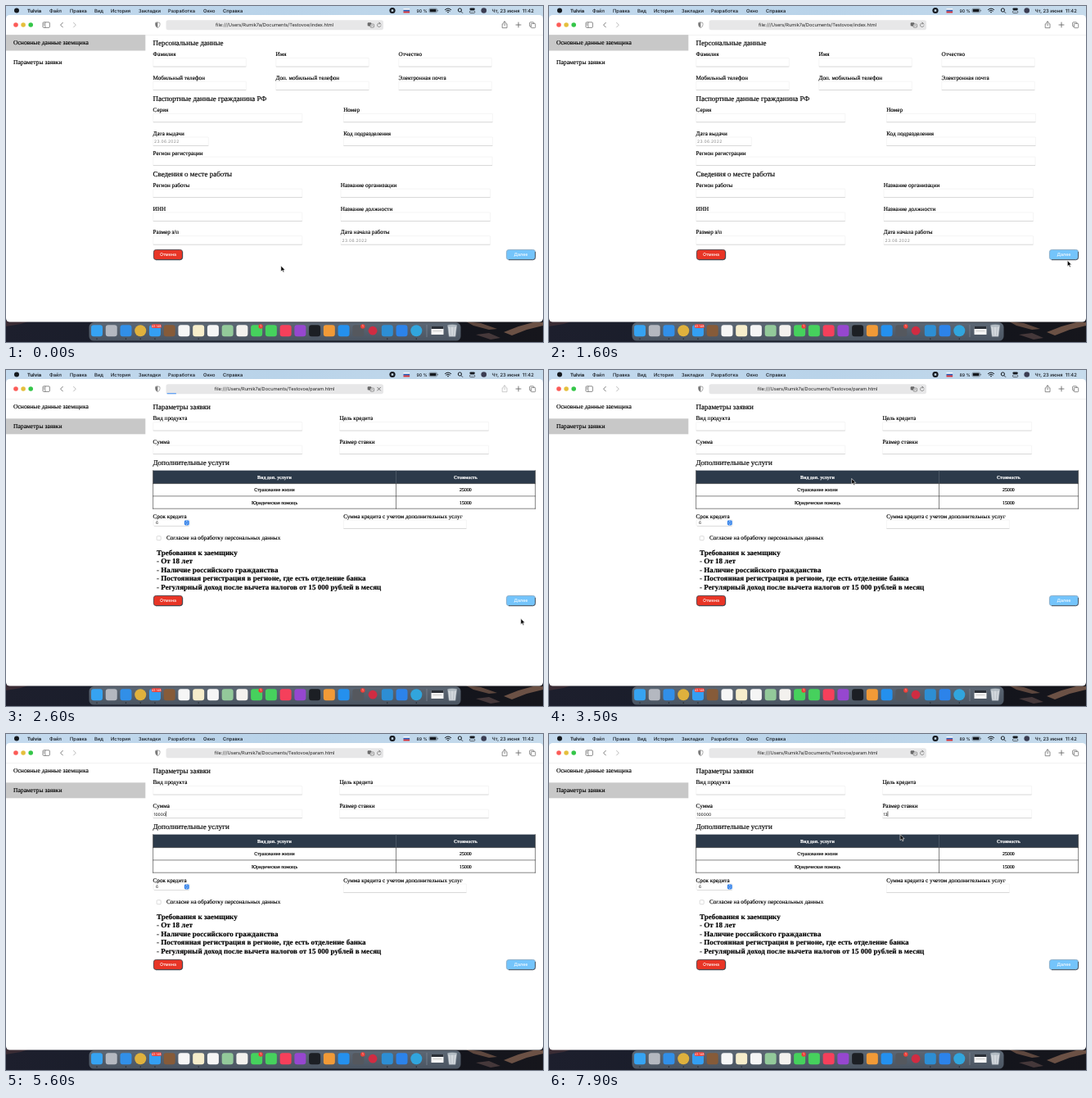
An HTML page that plays this animation: 656 px wide and 410 px high, repeating every 8 s.

```html
<!DOCTYPE html>
<html lang="ru">
<head>
<meta charset="utf-8">
<title>Заявка на кредит</title>
<style>
  html, body { margin: 0; width: 100%; height: 100%; overflow: hidden; background: #fff; }
  svg { display: block; width: 100vw; height: 100vh; }
  text { text-rendering: geometricPrecision; white-space: pre; }
  .serif { font-family: "Liberation Serif", "Noto Serif", serif; stroke-width: 0.16; }
  .ui { font-family: Inter, Roboto, sans-serif; }
</style>
</head>
<body>
<svg id="stage" viewBox="0 0 656 410" xmlns="http://www.w3.org/2000/svg"></svg>
<script>
const LOOP = 8000;
const stage = document.getElementById('stage');

// --- drawing helpers ---
function add(parent, tag, attrs = {}, content) {
  const node = document.createElementNS('http://www.w3.org/2000/svg', tag);
  for (const key in attrs) node.setAttribute(key, attrs[key]);
  if (content !== undefined) node.textContent = content;
  parent.appendChild(node);
  return node;
}
const group = parent => add(parent, 'g');
const rect = (p, x, y, width, height, fill, rx = 0, more = {}) =>
  add(p, 'rect', { x, y, width, height, fill, rx, ...more });
const circle = (p, cx, cy, r, fill) => add(p, 'circle', { cx, cy, r, fill });
const line = (p, d, stroke, width = 0.8) =>
  add(p, 'path', { d, stroke, 'stroke-width': width, fill: 'none', 'stroke-linecap': 'round', 'stroke-linejoin': 'round' });
const serif = (p, x, y, size, str, more = {}) => {
  const fill = more.fill || '#000';
  return add(p, 'text', { x, y, 'font-size': size, class: 'serif', stroke: fill, ...more, fill }, str);
};
const ui = (p, x, y, size, str, more = {}) =>
  add(p, 'text', { x, y, 'font-size': size, class: 'ui', fill: '#12161c', ...more }, str);
const show = (node, visible) => node.setAttribute('visibility', visible ? 'inherit' : 'hidden');
const moveTo = (node, x, y) => node.setAttribute('transform', `translate(${x} ${y})`);
const middle = { 'text-anchor': 'middle' };

function gradient(id, vertical, colors) {
  const g = add(stage, 'linearGradient', { id, x2: vertical ? 0 : 1, y2: vertical ? 1 : 0 });
  colors.forEach((color, i) =>
    add(g, 'stop', { offset: i / (colors.length - 1), 'stop-color': color }));
  return `url(#${id})`;
}

// --- desktop, menu bar ---
function drawDesktop() {
  rect(stage, 0, 0, 656, 410, gradient('sky', false, ['#c4daee', '#b9d3e9', '#c6dbec']));
  rect(stage, 0, 370, 656, 40, gradient('hills', false, ['#1d1f2d', '#191d2a', '#141823', '#12141c', '#16161c']));
  add(stage, 'path', { d: 'M0 384H30L18 388L0 391Z', fill: '#3a2c34' });
  // lit rocks on the right slope
  add(stage, 'path', { d: 'M562 385L580 387L600 394L590 395L571 390Z', fill: '#5d473e' });
  add(stage, 'path', { d: 'M608 398L626 391L644 386H656V390L636 395L618 402Z', fill: '#6b5145' });
  add(stage, 'path', { d: 'M574 401L590 399L604 405L592 407Z', fill: '#45383a' });
}

let battery;
function drawMenuBar() {
  circle(stage, 13, 5.5, 3, '#15191f');
  ui(stage, 26, 7.7, 5.8, 'Tulvia', { 'font-weight': 700 });
  const menus = { 53: 'Файл', 78: 'Правка', 108: 'Вид', 128: 'История', 162: 'Закладки',
    198: 'Разработка', 241: 'Окно', 265: 'Справка' };
  for (const x in menus) ui(stage, x, 7.7, 5.75, menus[x], { 'font-weight': 500 });

  circle(stage, 472, 5.5, 3.6, '#15191f');
  rect(stage, 470.7, 4.2, 2.6, 2.6, '#c4d8ea', 0.4);
  ['#f7f7f7', '#2456b5', '#d82f35'].forEach((color, i) => rect(stage, 485.5, 3 + i * 1.8, 7.6, 1.8, color));
  battery = ui(stage, 501.5, 7.5, 5.2, '90 %', { 'font-weight': 500 });
  rect(stage, 517, 3.1, 9.6, 4.9, 'none', 1.3, { stroke: '#4b5560', 'stroke-width': 0.5 });
  rect(stage, 517.7, 3.8, 7.8, 3.5, '#15191f', 0.7);
  rect(stage, 527.2, 4.7, 0.8, 1.7, '#4b5560', 0.4);
  line(stage, 'M536.4 4.5Q540 1.5 543.6 4.5M537.7 6Q540 4.2 542.3 6', '#15191f', 1);
  circle(stage, 540, 7.6, 0.8, '#15191f');
  circle(stage, 554.4, 5, 2.1, 'none').setAttribute('stroke', '#15191f');
  line(stage, 'M556 6.7L557.8 8.5', '#15191f');
  rect(stage, 566.4, 2.4, 6.4, 2.7, '#15191f', 1.3);
  rect(stage, 566.4, 5.9, 6.4, 2.7, 'none', 1.3, { stroke: '#15191f', 'stroke-width': 0.6 });
  circle(stage, 583.7, 5.5, 3.3, '#3b3d52');
  ui(stage, 593.6, 7.7, 5.85, 'Чт, 23 июня  11:42', { 'font-weight': 500 });
}

// --- browser window ---
let address, reload, stop, progress, share;
function drawWindow() {
  rect(stage, 0, 11, 656, 374.5, '#fff', 4.5);
  ['#fc5b57', '#e5bf3c', '#35c649'].forEach((color, i) => circle(stage, 12 + i * 9.1, 23, 2.8, color));
  rect(stage, 45, 19.8, 8.4, 6.6, 'none', 1.2, { stroke: '#5c5c5c', 'stroke-width': 0.7 });
  line(stage, 'M47.9 20V26.2M46.2 21.8H46.8M46.2 23.2H46.8', '#5c5c5c', 0.6);
  line(stage, 'M69.3 20.3L66.6 23.1L69.3 25.9', '#5c5c5c');
  line(stage, 'M82.6 20.3L85.3 23.1L82.6 25.9', '#a9a9a9');
  line(stage, 'M185.3 19.8L188 20.7V23Q188 25.5 185.3 26.6Q182.6 25.5 182.6 23V20.7Z', '#777', 0.6);
  add(stage, 'path', { d: 'M185.3 19.8V26.6Q182.6 25.5 182.6 23V20.7Z', fill: '#777' });
  rect(stage, 195.5, 17.2, 265.5, 12, '#e7e7e8', 2.6);
  address = ui(stage, 328, 25.1, 5.65, '', { ...middle, fill: '#1f1f1f' });
  progress = rect(stage, 196.5, 28.2, 11.5, 1, '#3b8cf4', 0.5);

  rect(stage, 441.7, 20.2, 4.6, 4.2, '#666', 1);
  rect(stage, 445, 22, 4.6, 4.2, '#e7e7e8', 1, { stroke: '#666', 'stroke-width': 0.6 });
  line(stage, 'M443 22.3H445M446.4 24.8L447.3 23L448.2 24.8', '#888', 0.5);
  reload = line(stage, 'M457.9 22.2A2.3 2.3 0 1 0 458 24.1M456 20.1L457.2 21.1L456.1 22.2', '#666', 0.7);
  stop = line(stage, 'M453.7 21.2L457.5 25M457.5 21.2L453.7 25', '#555', 0.8);
  share = line(stage, 'M607.3 21.8H606.2V26.7H612V21.8H610.9M609.1 24V18.9M607.4 20.5L609.1 18.8L610.8 20.5', '#5c5c5c', 0.7);
  line(stage, 'M623 23H629M626 20V26', '#5c5c5c');
  rect(stage, 639.6, 19.8, 5.3, 5.3, 'none', 1, { stroke: '#5c5c5c', 'stroke-width': 0.7 });
  rect(stage, 641.4, 21.4, 5.3, 5.3, '#fff', 1, { stroke: '#5c5c5c', 'stroke-width': 0.7 });
  rect(stage, 0, 35, 656, 0.4, '#dedede');
}

// --- dock ---
function drawDock() {
  rect(stage, 101.5, 386.3, 454, 22.2, gradient('glass', true, ['#5c6774', '#4b5562']), 5.5);
  const colors = ['#36a3f2', '#b4b8c0', '#318fe8', '#dfb13d', '#349ff3', '#865b39', '#f6f6f6', '#f6edcb',
    '#f5f5f5', '#93c99a', '#f3f1ee', '#46d15d', '#46d15d', '#f5405b', '#9647cf', '#1c1f24',
    '#f19a37', '#2490ee', '#55585e', '#d02c42', '#2d8ed4', '#2c83ea', '#31a5dd'];
  const round = [3, 19, 22];
  const running = [0, 2, 3, 4, 7, 20, 22];
  const slot = i => 111 + i * 17.74;
  colors.forEach((color, i) => {
    const x = slot(i);
    if (round.includes(i)) circle(stage, x, 396.2, i === 19 ? 5.4 : 7, color);
    else rect(stage, x - 7, 389.2, 14, 14, color, 3.2);
    if (running.includes(i)) circle(stage, x, 406.1, 0.7, '#15191f');
  });
  rect(stage, 177.5, 388.3, 12.5, 4.8, '#ee3f38', 2.4);
  ui(stage, 183.7, 392.1, 3.6, '43 148', { ...middle, fill: '#fff' });
  for (const [i, dx] of [[11, 5], [18, 5.5]]) {
    circle(stage, slot(i) + dx, 391, 2.7, '#ee3f38');
    ui(stage, slot(i) + dx, 392.4, 3.8, '1', { ...middle, fill: '#fff' });
  }
  rect(stage, 513.7, 389, 0.6, 15, '#8791a0');
  rect(stage, 519.5, 391, 15, 10, '#f4f4f4', 0.6);
  rect(stage, 519.5, 391, 15, 3, '#2b3038', 0.6);
  rect(stage, 521.5, 396, 11, 0.7, '#bbb');
  add(stage, 'path', { d: 'M539.6 389.8H550.6L549 403.2H541.2Z', fill: '#d3d8dd', stroke: '#9aa4ae', 'stroke-width': 0.6 });
  line(stage, 'M543 391.5L543.6 401.5M547.2 391.5L546.6 401.5', '#a4adb6', 0.6);
  add(stage, 'ellipse', { cx: 545.1, cy: 390, rx: 5.5, ry: 1.2, fill: '#b9c1c8', stroke: '#8f9aa5', 'stroke-width': 0.4 });
}

// --- form parts ---
const heading = (p, y, str) => serif(p, 179.5, y, 8.98, str);
function input(p, x, y, width, height = 10.6) {
  rect(p, x, y, width, height, '#fff', 0.4, { stroke: '#ebebeb', 'stroke-width': 0.5 });
  rect(p, x, y + height - 0.4, width, 0.6, '#c6c6c6');
}
function field(p, x, baseline, width, str) {
  serif(p, x - 0.2, baseline, 7.15, str);
  input(p, x, baseline + 2.4, width);
}
const dateValue = (p, x, y) =>
  ui(p, x, y, 5, '23.06.2022', { fill: '#858585', 'letter-spacing': 0.35 });
function button(p, x, y, color, border, str) {
  const g = group(p);
  const box = rect(g, x, y, 35.2, 12.2, color, 3, { stroke: border, 'stroke-width': 0.9 });
  line(g, `M${x + 3} ${y + 12.3}H${x + 32.2}Q${x + 35.2} ${y + 12.3} ${x + 35.2} ${y + 9}V${y + 3}`, '#3f4650', 0.9);
  ui(g, x + 17.6, y + 8, 5.3, str, { ...middle, fill: '#fff', 'font-weight': 500 });
  return { g, box };
}
function buttons(p, y) {
  button(p, 180.4, y, '#e83526', '#4a3f47', 'Отмена');
  return button(p, 611.4, y, '#74c4fb', '#86a9c4', 'Далее');
}
function sidebar(p, bandY, bandHeight) {
  rect(p, 0, bandY, 170.3, bandHeight, '#c8c8c8');
  serif(p, 9, 47, 7.6, 'Основные данные заемщика');
  serif(p, 9, 71.2, 7.6, 'Параметры заявки');
}

let nextButton;
function drawBorrowerPage(p) {
  sidebar(p, 35.2, 19.3);
  heading(p, 48, 'Персональные данные');
  ['Фамилия', 'Имя', 'Отчество'].forEach((str, i) => field(p, 179.8 + i * 150, 61.1, 113.5, str));
  ['Мобильный телефон', 'Доп. мобильный телефон', 'Электронная почта']
    .forEach((str, i) => field(p, 179.8 + i * 150, 89.7, 113.5, str));
  heading(p, 116.2, 'Паспортные данные гражданина РФ');
  field(p, 179.8, 128.9, 182, 'Серия');
  field(p, 412.4, 128.9, 182, 'Номер');
  field(p, 179.8, 157.6, 67.5, 'Дата выдачи');
  dateValue(p, 181, 167.2);
  field(p, 412.4, 157.6, 182, 'Код подразделения');
  field(p, 179.8, 181.7, 414.2, 'Регион регистрации');
  heading(p, 208.1, 'Сведения о месте работы');
  [['Регион работы', 'Название организации'], ['ИНН', 'Название должности'], ['Размер з/п', 'Дата начала работы']]
    .forEach(([left, right], i) => {
      field(p, 179.8, 220.8 + i * 28.7, 182, left);
      field(p, 409, 220.8 + i * 28.7, 182.5, right);
    });
  dateValue(p, 410.5, 287.9);
  nextButton = buttons(p, 297.4);
}

let amount, rate;
function drawLoanPage(p) {
  sidebar(p, 59.3, 19);
  heading(p, 48, 'Параметры заявки');
  [['Вид продукта', 'Цель кредита'], ['Сумма', 'Размер ставки']].forEach(([left, right], i) => {
    field(p, 179.8, 61.1 + i * 28.6, 182, left);
    field(p, 407.6, 61.1 + i * 28.6, 182, right);
  });
  amount = ui(p, 180.4, 99.5, 5, '', { fill: '#000' });
  rate = ui(p, 408.4, 99.5, 5, '', { fill: '#000' });

  heading(p, 116.2, 'Дополнительные услуги');
  rect(p, 179.6, 122.6, 467, 16, '#2c3a4a');
  line(p, 'M179.6 138.6H646.6M179.6 153.9H646.6M179.6 169.2H646.6M179.6 122.6V169.2M476.5 138.6V169.2M646.6 122.6V169.2', '#333', 0.6);
  line(p, 'M476.5 122.8V138.4', '#66717d', 0.5);
  [['Вид доп. услуги', 'Стоимость'], ['Страхование жизни', '25000'], ['Юридическая помощь', '15000']]
    .forEach(([name, price], i) => {
      const style = i ? middle : { ...middle, fill: '#fff', 'font-weight': 700 };
      serif(p, 328, 132.6 + i * 15.5, 5.92, name, style);
      serif(p, 561.4, 132.6 + i * 15.5, 5.92, price, style);
    });

  serif(p, 179.6, 180.6, 7.15, 'Срок кредита');
  rect(p, 180, 182.6, 44.5, 7.9, '#fff', 1.6, { stroke: '#e2e2e2', 'stroke-width': 0.5 });
  rect(p, 181, 190.2, 42.5, 0.5, '#c6c6c6');
  ui(p, 183, 188.4, 5, '6', { fill: '#222' });
  rect(p, 217.9, 183.5, 5.8, 6, '#2f7fe9', 1.4);
  line(p, 'M219.6 185.8L220.8 184.6L222 185.8M219.6 187.2L220.8 188.4L222 187.2', '#fff', 0.6);
  field(p, 412.4, 180.6, 150, 'Сумма кредита с учетом дополнительных услуг');

  rect(p, 184.2, 202.7, 5, 5, '#fff', 1, { stroke: '#b5b5b5', 'stroke-width': 0.5 });
  serif(p, 196, 207.4, 7.15, 'Согласие на обработку персональных данных');
  ['Требования к заемщику', '- От 18 лет', '- Наличие российского гражданства',
    '- Постоянная регистрация в регионе, где есть отделение банка',
    '- Регулярный доход после вычета налогов от 15 000 рублей в месяц']
    .forEach((str, i) => serif(p, 184, 225.6 + i * 10.5, 9.05, str, { 'font-weight': 700 }));
  buttons(p, 275.4);
}

// --- scene ---
drawDesktop();
drawMenuBar();
drawWindow();
const borrowerPage = group(stage);
const loanPage = group(stage);
drawBorrowerPage(borrowerPage);
drawLoanPage(loanPage);
drawDock();
const caret = rect(stage, 0, 94.3, 0.6, 6.4, '#111');
const arrow = add(stage, 'path', { d: 'M0 0V7.1L1.7 5.6L2.8 8.1L4 7.6L2.9 5.2H5.1Z', fill: '#000', stroke: '#fff', 'stroke-width': 0.6 });
const beam = line(stage, 'M-1.2 -4Q0 -4 0 -3V3Q0 4 -1.2 4M1.2 -4Q0 -4 0 -3M0 3Q0 4 1.2 4', '#222', 0.7);

// --- timing ---
const pointerPath = [
  [0, 335.7, 317], [450, 480, 326], [900, 651.5, 344.8], [1200, 648, 335], [1750, 629, 303.4],
  [2600, 629, 303.4], [3100, 500, 228], [3500, 369.8, 132.5], [3800, 316, 95.5],
  [6350, 316, 95.5], [6600, 390, 76], [6900, 488, 95.2], [7790, 488, 95.2], [7800, 429, 122.6], [LOOP, 429, 122.6]
];
const amountKeys = [4700, 4800, 5000, 5100, 5300, 5700];
const rateKeys = [7500, 7800];
const caretOn = [[4000, 4500], [4700, 6200], [7300, LOOP]];
const within = (t, ranges) => ranges.some(([from, to]) => t >= from && t < to);
const typed = (str, keys, t) => str.slice(0, keys.filter(key => t >= key).length);

function pointerAt(t) {
  const i = Math.max(1, pointerPath.findIndex(([time]) => time > t));
  const [t0, x0, y0] = pointerPath[i - 1];
  const [t1, x1, y1] = pointerPath[i];
  const k = (t - t0) / (t1 - t0);
  const eased = k + 0.5 * (k * k * (3 - 2 * k) - k);
  return [x0 + (x1 - x0) * eased, y0 + (y1 - y0) * eased];
}

function render(t) {
  const onLoan = t >= 2600;
  const loading = t >= 2600 && t < 2700;
  show(borrowerPage, !onLoan);
  show(loanPage, onLoan);
  address.textContent = `file:///Users/Rumik7a/Documents/Testovoe/${onLoan ? 'param' : 'index'}.html`;
  battery.textContent = t < 3000 ? '90 %' : '89 %';
  show(progress, loading);
  show(stop, loading);
  show(reload, !loading);
  share.setAttribute('stroke', loading ? '#b5b5b5' : '#5c5c5c');

  const hovered = t >= 1700;
  moveTo(nextButton.g, hovered ? -0.9 : 0, hovered ? -0.9 : 0);
  nextButton.box.setAttribute('stroke', hovered ? '#4d6c86' : '#86a9c4');

  amount.textContent = typed('100000', amountKeys, t);
  rate.textContent = typed('13', rateKeys, t);
  const active = t < 7000 ? amount : rate;
  const start = Number(active.getAttribute('x'));
  const width = active.textContent ? active.getComputedTextLength() : 0;
  caret.setAttribute('x', start + width + 0.1);
  show(caret, within(t, caretOn));

  const [x, y] = pointerAt(t);
  const hidden = within(t, [[4800, 6400], [7500, 7800]]);
  const overField = within(t, [[3700, 6450], [6800, 7800]]);
  moveTo(arrow, x, y);
  moveTo(beam, x, y);
  show(arrow, !hidden && !overField);
  show(beam, !hidden && overField);
}

const began = performance.now();
function tick() {
  render((performance.now() - began) % LOOP);
  requestAnimationFrame(tick);
}
tick();
</script>
</body>
</html>
```
